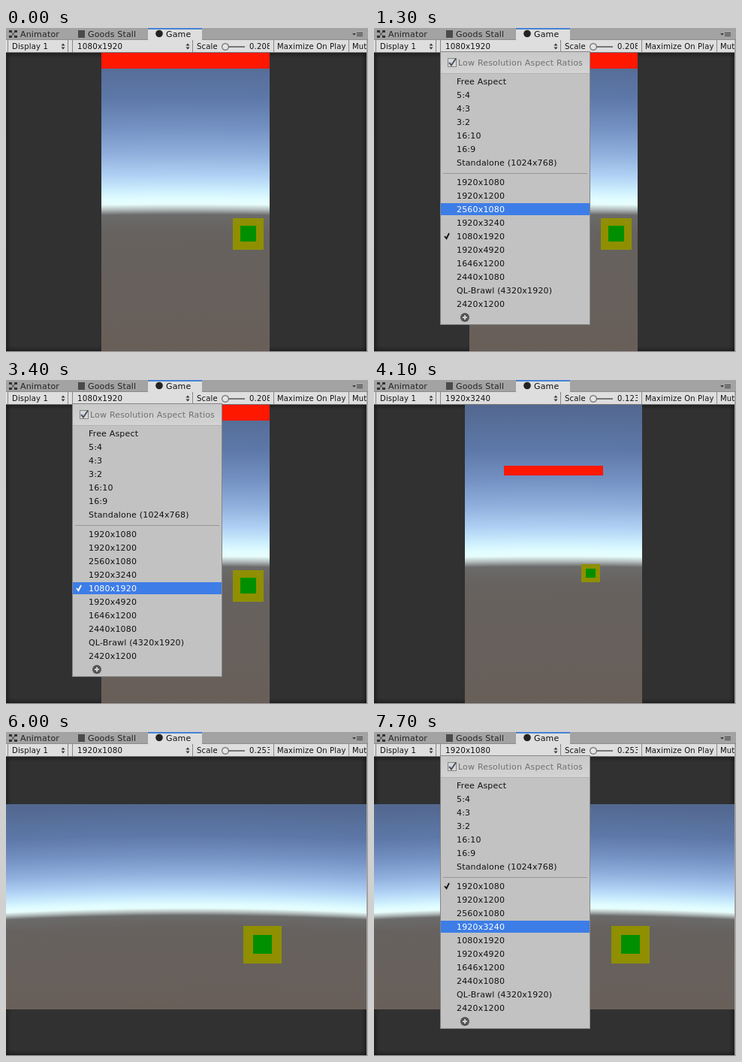
An HTML page with a canvas that plays this animation: 482 px wide and 431 px high, repeating every 8 s.

```html
<!DOCTYPE html>
<html lang="en">
<head>
<meta charset="utf-8">
<title>Game view aspect menu</title>
<style>
  html, body { margin: 0; width: 100%; height: 100%; overflow: hidden; background: #a3a3a3; }
  canvas { display: block; }
</style>
</head>
<body>
<canvas id="stage" width="482" height="431"></canvas>
<script>
const ctx = document.getElementById('stage').getContext('2d');
const LOOP = 8000;

// Game views: picture area, scale readout and coloured boxes [x, y, w, h, colour]
const RED = '#ff1800', OLIVE = '#8f8f00', GREEN = '#008f00';
const VIEWS = {
  '1080x1920': { area: [127, 33, 224, 397], scale: '0.208', boxes: [
    [127, 33, 224, 21, RED], [302, 253, 41, 42, OLIVE], [312, 263, 21, 21, GREEN]] },
  '1920x3240': { area: [121, 33, 236, 397], scale: '0.123', boxes: [
    [173, 114, 132, 13, RED], [276, 245, 25, 24, OLIVE], [282, 251, 13, 12, GREEN]] },
  '1920x1080': { area: [0, 96, 480, 273], scale: '0.253', boxes: [
    [316, 258, 51, 50, OLIVE], [329, 270, 25, 25, GREEN]] },
};

const SKY = [
  [0, '#536890'], [.15, '#5d78a8'], [.25, '#7391c2'], [.34, '#91b0dd'], [.41, '#b0d1f4'],
  [.46, '#cceefd'], [.49, '#e2fdff'], [.507, '#e6fdfb'], [.525, '#b0b9b8'], [.542, '#6b6b6b'],
  [.6, '#66625f'], [1, '#695f59']];

const RATIOS = ['Free Aspect', '5:4', '4:3', '3:2', '16:10', '16:9', 'Standalone (1024x768)'];
const SIZES = ['1920x1080', '1920x1200', '2560x1080', '1920x3240', '1080x1920', '1920x4920',
  '1646x1200', '2440x1080', 'QL-Brawl (4320x1920)', '2420x1200'];
const ITEMS = [
  ...RATIOS.map((label, i) => ({ label, y: 71 + 18 * i })),
  ...SIZES.map((label, i) => ({ label, y: 205 + 18 * i }))];

// Each visit: chosen size, start, menu opening, then [time, hovered item]
const VISITS = [
  { size: '1080x1920', start: 0, open: 600, hover: [
    [1100, '3:2'], [1200, 'Standalone (1024x768)'], [1300, '2560x1080'], [1400, '1080x1920'],
    [1600, '1920x4920'], [1700, '1646x1200'], [1900, '1920x4920'],
    [3400, '1080x1920'], [3500, '1920x3240']] },
  { size: '1920x3240', start: 4100, open: 5200, hover: [
    [5500, '3:2'], [5600, '16:9'], [5700, 'Standalone (1024x768)'], [5800, '1920x1080']] },
  { size: '1920x1080', start: 6000, open: 6600, hover: [
    [7000, '4:3'], [7100, '16:10'], [7200, 'Standalone (1024x768)'], [7300, '1920x1200'],
    [7600, '2560x1080'], [7700, '1920x3240']] },
];

function rect(x, y, w, h, color) {
  ctx.fillStyle = color;
  ctx.fillRect(x, y, w, h);
}

function circle(x, y, r, color) {
  ctx.fillStyle = color;
  ctx.beginPath();
  ctx.arc(x, y, r, 0, 2 * Math.PI);
  ctx.fill();
}

function shape(points, color) {
  ctx.fillStyle = color;
  ctx.beginPath();
  points.forEach(p => ctx.lineTo(...p));
  ctx.fill();
}

function stroke(points, color, width) {
  ctx.strokeStyle = color;
  ctx.lineWidth = width;
  ctx.beginPath();
  points.forEach(p => ctx.lineTo(...p));
  ctx.stroke();
}

function text(str, x, y, size = 11, color = '#111', right = 480) {
  ctx.save();
  ctx.beginPath();
  ctx.rect(0, 0, right, 431);
  ctx.clip();
  ctx.font = `${size}px "DejaVu Sans", sans-serif`;
  ctx.letterSpacing = '0.18px';
  ctx.fillStyle = color;
  ctx.fillText(str, x, y);
  ctx.restore();
}

function gradient(x0, y0, x1, y1, stops) {
  const g = ctx.createLinearGradient(x0, y0, x1, y1);
  stops.forEach(s => g.addColorStop(...s));
  return g;
}

function tick(x, y, color) {
  stroke([[x, y], [x + 2.5, y + 3], [x + 6, y - 4]], color, 1.8);
}

function arrows(x) {
  shape([[x - 2.5, 23.5], [x + 2.5, 23.5], [x, 20.5]], '#333');
  shape([[x - 2.5, 25.5], [x + 2.5, 25.5], [x, 28.5]], '#333');
}

function drawTabs() {
  rect(0, 0, 482, 431, '#a3a3a3');
  rect(0, 15, 482, 1, '#8b8b8b');
  rect(189, 0, 72, 16, '#dedede');
  rect(189, 0, 72, 2, '#4784d6');

  stroke([[6, 4], [13, 12]], '#444', 1);
  stroke([[13, 4], [6, 12]], '#444', 1);
  for (const x of [4, 11]) for (const y of [3, 10]) rect(x, y, 4, 3, '#333');
  text('Animator', 19, 12, 11, '#222');
  rect(96, 3, 9, 10, '#4a4a4a');
  text('Goods Stall', 109, 12, 11, '#222');
  circle(204, 7.5, 4.8, '#222');
  text('Game', 213, 12);

  shape([[461, 7], [466, 7], [463.5, 10]], '#444');
  for (const y of [6, 8, 10]) rect(467, y, 8, 1, '#444');
}

function drawToolbar(size, scale) {
  rect(0, 16, 480, 16, '#dedede');
  rect(0, 32, 480, 1, '#777');
  for (const x of [2, 82, 88, 248, 356, 456]) rect(x, 16, 1, 16, '#888');
  text('Display 1', 8, 28, 10);
  arrows(76);
  text(size, 95, 28, 10.3);
  arrows(242);
  text('Scale', 254, 28, 10);
  rect(292, 24, 26, 2, '#777');
  circle(292, 25, 4.8, '#555');
  circle(292, 25, 3.8, '#e4e4e4');
  text(scale, 324, 28, 10, '#111', 351);
  text('Maximize On Play', 361, 28, 10);
  text('Mute Audio', 461, 28, 10);
}

function drawView({ area: [x, y, w, h], boxes }) {
  rect(0, 33, 480, 397, '#313131');
  const clear = 'rgba(0,0,0,0)', shade = 'rgba(0,0,0,.3)', fade = [[0, shade], [1, clear]];
  rect(0, 33, 7, 397, gradient(0, 0, 7, 0, fade));
  rect(473, 33, 7, 397, gradient(480, 0, 473, 0, fade));
  rect(0, 33, 480, 7, gradient(0, 33, 0, 40, fade));
  rect(0, 423, 480, 7, gradient(0, 430, 0, 423, fade));

  // The horizon bends down towards the sides
  for (let i = 0; i < w; i += 2) {
    const dx = (i + 1 - w / 2) / 240;
    const dy = 6 * dx * dx * 273 / h;
    rect(x + i, y, 2, h, gradient(0, y + dy, 0, y + h + dy, SKY));
  }
  boxes.forEach(b => rect(...b));
}

function drawMenu(size, hovered) {
  rect(88, 31, 200, 364, '#858585');
  rect(89, 32, 198, 362, '#c2c2c2');
  rect(89, 32, 198, 29, gradient(0, 32, 0, 61, [[0, '#c9c9c9'], [1, '#d3d3d3']]));
  rect(89, 60, 198, 1, '#b4b4b4');

  rect(98, 40, 12, 12, '#858585');
  rect(99, 41, 10, 10, '#dadada');
  stroke([[100, 46], [103, 49.5], [109, 40.5]], '#4b5668', 2);
  text('Low Resolution Aspect Ratios', 112, 50, 11, '#707070');
  rect(92, 193, 192, 1, '#969696');

  for (const { label, y } of ITEMS) {
    const color = label === hovered ? '#fff' : '#111';
    if (label === hovered) rect(89, y - 8, 198, 16, '#3d7de7');
    if (label === size) tick(94, y, color);
    text(label, 110, y + 4, 11, color);
  }

  circle(121, 385, 6, '#555');
  rect(118, 384, 6, 2, '#d0d0d0');
  rect(120, 382, 2, 6, '#d0d0d0');
}

function draw(time) {
  const t = time % LOOP;
  const visit = VISITS.findLast(v => t >= v.start);
  const hover = visit.hover.findLast(h => t >= h[0]);
  const view = VIEWS[visit.size];
  drawTabs();
  drawToolbar(visit.size, view.scale);
  drawView(view);
  if (t >= visit.open) drawMenu(visit.size, hover && hover[1]);
}

const begin = performance.now();
function frame() {
  draw(performance.now() - begin);
  requestAnimationFrame(frame);
}
frame();
</script>
</body>
</html>
```
